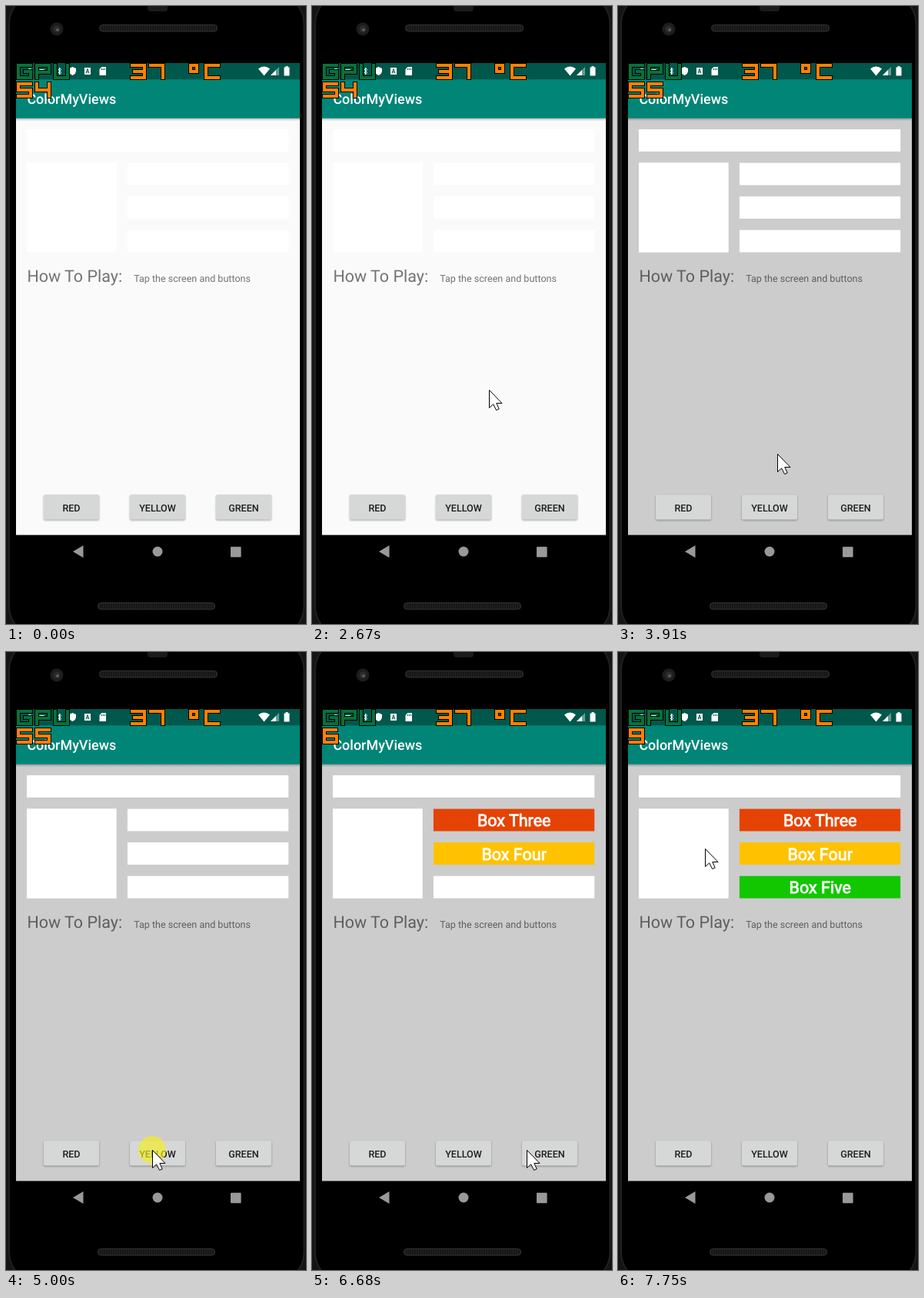
Recreate the animation shown at these times as an HTML page. Size 390x802 px, loop 8000 ms.

```html
<!DOCTYPE html>
<html lang="en">
<head>
<meta charset="utf-8">
<title>Color boxes</title>
<style>
  html, body { margin: 0; width: 100%; height: 100%; overflow: hidden; background: #000; }
  svg {
    display: block; width: 390px; height: 802px;
    font-family: Roboto, sans-serif; text-rendering: geometricPrecision;
  }
  .medium { font-weight: 500; }
  .hint { fill: #000; fill-opacity: .54; }
  .button rect { fill: #d6d7d7; filter: drop-shadow(0 1px 1px rgba(0, 0, 0, .35)); }
  .button text { font-size: 12.57px; font-weight: 500; fill: #000; fill-opacity: .87; text-anchor: middle; }
  .label { font-size: 21.5px; fill: #fff; stroke: #fff; stroke-width: .8; text-anchor: middle; }
  .meter path { fill: none; stroke-linecap: square; stroke-linejoin: miter; }
</style>
</head>
<body>
<svg viewBox="0 0 390 802">
  <defs>
    <linearGradient id="shade" x2="0" y2="1">
      <stop stop-opacity=".25"/><stop offset="1" stop-opacity="0"/>
    </linearGradient>
    <pattern id="mesh" width="3" height="3" patternUnits="userSpaceOnUse">
      <rect width="3" height="3" fill="#171717"/><rect width="1" height="3" fill="#222"/>
    </pattern>
  </defs>

  <!-- Phone body -->
  <rect width="390" height="802" fill="#141414"/>
  <rect x="4" y="-18" width="383.5" height="838" rx="42" fill="#000" stroke="#202020" stroke-width="2"/>
  <path d="M184 0H210V3Q210 7 206 7H188Q184 7 184 3Z" fill="#1b1b1b"/>
  <circle cx="66" cy="30" r="8.5" fill="#1d1d1d"/>
  <circle cx="66" cy="30" r="4.5" fill="#2b2d30"/>
  <circle cx="67" cy="31" r="1.8" fill="#60666c"/>
  <g fill="url(#mesh)" stroke="#333">
    <rect x="121.5" y="24.5" width="153" height="8.5" rx="4"/>
    <rect x="119.5" y="774.5" width="152" height="8.5" rx="4"/>
  </g>

  <!-- App -->
  <rect id="page" x="13" y="145" width="369" height="541.5"/>
  <rect x="13" y="145.8" width="369" height="3.5" fill="url(#shade)"/>
  <rect x="13" y="95" width="369" height="50.8" fill="#008577"/>
  <rect x="13" y="74" width="369" height="21.3" fill="#00574b"/>
  <text class="medium" x="27.4" y="127.2" font-size="17.96" fill="#fff">ColorMyViews</text>
  <g id="boxes"></g>
  <text class="hint" x="27.4" y="358" font-size="21.5">How To Play:</text>
  <text class="hint" x="166.2" y="358" font-size="12.57">Tap the screen and buttons</text>
  <g id="buttons"></g>

  <!-- Status icons -->
  <g fill="#fff">
    <circle cx="31" cy="84" r="3"/>
    <rect x="43" y="82" width="7" height="6" rx="1"/>
    <path d="M68 82L71.500 86.500L69.500 89V80L71.500 82.500L68 87" fill="none" stroke="#fff"/>
    <path d="M86.500 79L91 81V84.500Q90.500 88.500 86.500 90Q82.500 88.500 82 84.500V81Z"/>
    <path d="M102 80H110V89H102Z"/>
    <path d="M104 87.500L106 81.500L108 87.500M104.800 85.700H107.200" fill="none" stroke="#00574b"/>
    <path d="M124.500 79H130V90H121.500V82Z"/>
    <path d="M124.500 81V83M126.500 81V83M128.500 81V83" stroke="#00574b"/>
    <path d="M328 81.500Q335.500 75.500 343 81.500L335.500 90.500Z"/>
    <path d="M355 79V90H344Z" opacity=".4"/>
    <path d="M351 83V90H344Z"/>
    <path d="M363.500 78H366.500V79.500H368.500V90.500H361.500V79.500H363.500Z"/>
  </g>
  <g id="meters"></g>

  <!-- Navigation -->
  <g fill="#999">
    <path d="M87 708L100.500 700V716Z"/>
    <circle cx="197" cy="708" r="6.500"/>
    <rect x="292" y="701.700" width="13.600" height="13.600" rx="1"/>
  </g>

  <g id="pointer">
    <circle id="tap" r="18" fill="#f5f01e" fill-opacity=".65"/>
    <path d="M.5 .5V23.500L5.700 18.800L9.600 26.500L13.200 24.900L9.800 17.500H17Z" fill="#fff" stroke="#000"/>
  </g>
</svg>
<script>
const LOOP = 8000;
const $ = id => document.getElementById(id);

const boxes = [
  { x: 27, y: 160, w: 340.2, h: 28.8 },
  { x: 27, y: 203.3, w: 116.7, h: 116.5 },
  { x: 157.9, y: 203.6, w: 209.3, h: 28.9, name: 'Box Three', color: '#e54304', at: 6370 },
  { x: 157.9, y: 247.1, w: 209.3, h: 28.9, name: 'Box Four', color: '#ffc200', at: 5300 },
  { x: 157.9, y: 290.7, w: 209.3, h: 28.9, name: 'Box Five', color: '#12c700', at: 7060 },
];
$('boxes').innerHTML = boxes.map(b =>
  `<rect x="${b.x}" y="${b.y}" width="${b.w}" height="${b.h}"/>` +
  (b.name ? `<text class="label" x="262.700" y="${b.y + 22.6}">${b.name}</text>` : '')).join('');
const boxRects = [...$('boxes').querySelectorAll('rect')];
const labels = [...$('boxes').querySelectorAll('text')];

$('buttons').innerHTML = ['RED', 'YELLOW', 'GREEN'].map((name, i) => {
  const x = 85 + 112 * i;
  return `<g class="button"><rect x="${x - 36}" y="634.200" width="72" height="32.400" rx="1.800"/>
    <text x="${x}" y="655.500">${name}</text></g>`;
}).join('');

// Block letters on a 16 by 16 grid
const glyphs = {
  G: 'M16 0H0V16H16V8H9', P: 'M0 16V0H16V9H0', U: 'M0 0V16H16V0',
  C: 'M16 0H0V16H16', '°': 'M4 0H12V8H4Z',
  0: 'M0 0H16V16H0Z', 3: 'M0 0H16V16H0M3 8H16', 4: 'M0 0V8H16M16 0V16',
  5: 'M16 0H0V8H16V16H0', 6: 'M15 0H0V16H16V8H0', 7: 'M0 0H16V16',
  9: 'M16 8H0V0H16V16H0',
};
function meter(text, x, y, color) {
  const draw = (c, width) => [...text].map((ch, i) => glyphs[ch]
    ? `<path d="${glyphs[ch]}" transform="translate(${x + 24 * i} ${y})" stroke="${c}" stroke-width="${width}"/>`
    : '').join('');
  return `<g class="meter">${draw('#000', 6)}${draw(color, 4)}</g>`;
}
const loads = [[0, '54'], [2900, '55'], [5300, '0'], [6370, '6'], [7060, '9']];
$('meters').innerHTML = meter('GPU', 16, 77, '#08713a') + meter('37 °C', 164, 77, '#ff8000') +
  loads.map(([, value]) => meter(value, 16, 101, '#ff8000')).join('');
const loadViews = [...$('meters').children].slice(2);

// Pointer moves: start, number of steps, step length, end x, end y, easing
const smooth = p => p * p * (3 - 2 * p);
const linear = p => p;
const moves = [
  [1060, 11, 78, 248, 516, smooth],
  [1900, 2, 80, 248, 509, linear],
  [2300, 3, 70, 230, 498, linear],
  [3450, 11, 77, 190, 645, smooth],
  [4450, 1, 1, 190, 646, linear],
  [5220, 11, 77, 101, 651, smooth],
  [6220, 7, 76.6, 279, 646, smooth],
  [7140, 5, 77.5, 266, 548, p => p * p],
  [7520, 4, 76.6, 113, 255, linear],
];
const taps = [[2590, 2670], [5000, 5060], [6060, 6140], [6760, 6840]];

function pointerAt(t) {
  let x = 325, y = 776;
  for (const [start, steps, length, endX, endY, ease] of moves) {
    if (t < start) break;
    const p = ease(Math.min(steps, Math.floor((t - start) / length) + 1) / steps);
    x += (endX - x) * p;
    y += (endY - y) * p;
  }
  return [Math.round(x), Math.round(y)];
}

const show = (el, on) => { el.style.display = on ? '' : 'none'; };

function render(t) {
  $('page').setAttribute('fill', t < 2900 ? '#fafafa' : '#ccc');
  boxes.forEach((b, i) => {
    const lit = b.name && t >= b.at;
    boxRects[i].setAttribute('fill', lit ? b.color : '#fff');
    if (b.name) show(labels[i - 2], lit);
  });
  loadViews.forEach((view, i) =>
    show(view, t >= loads[i][0] && t < (loads[i + 1]?.[0] ?? LOOP)));
  show($('pointer'), t >= 1060);
  $('pointer').setAttribute('transform', `translate(${pointerAt(t)})`);
  show($('tap'), taps.some(([on, off]) => t >= on && t < off));
}

const begin = performance.now();
function tick() {
  render((performance.now() - begin) % LOOP);
  requestAnimationFrame(tick);
}
tick();
</script>
</body>
</html>
```
